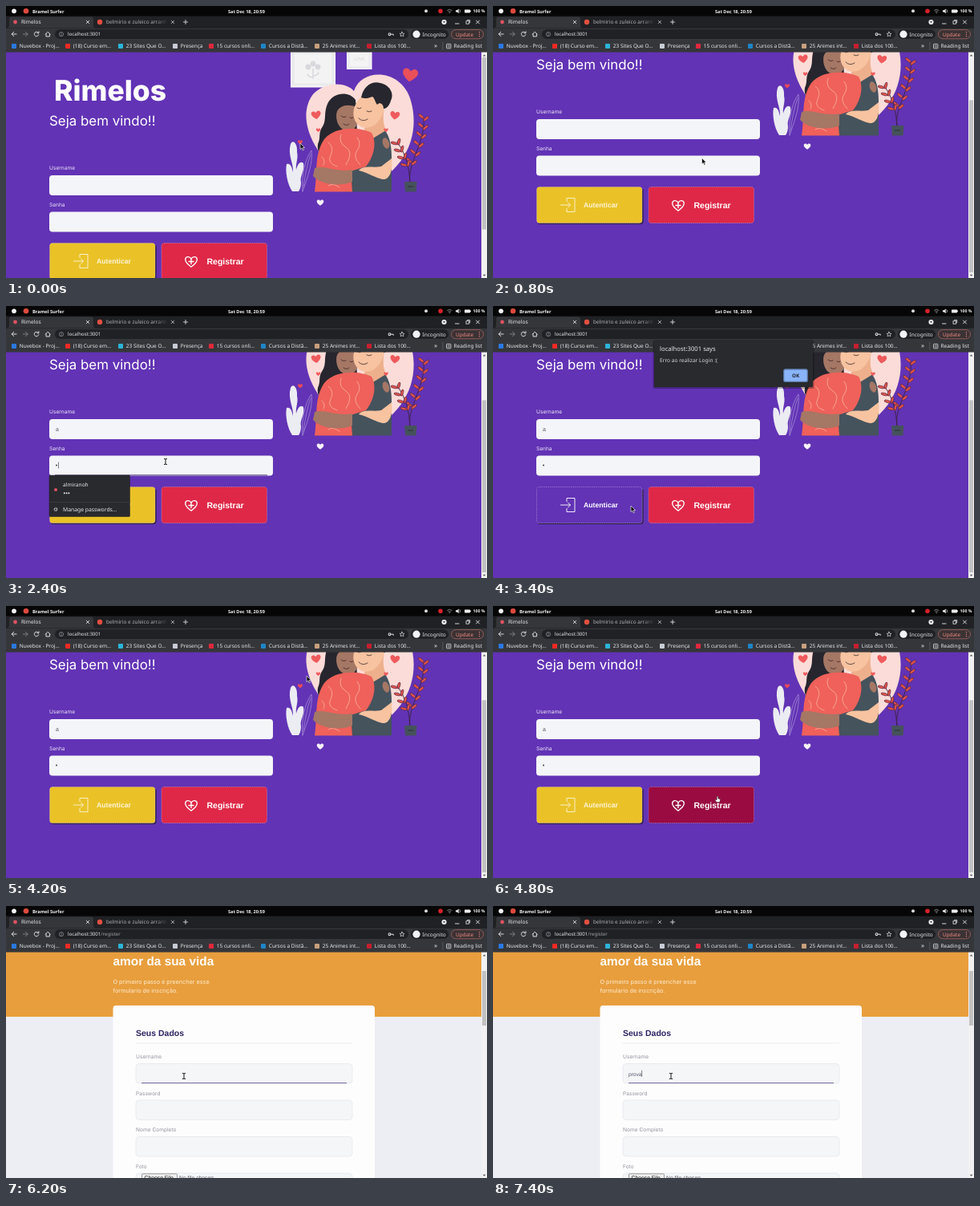
An HTML page for the animation above (8 s loop, 600 by 339 pixels).

```html
<!DOCTYPE html>
<html lang="pt">
<head>
<meta charset="utf-8">
<title>Rimelos</title>
<style>
html, body { margin: 0; width: 100%; height: 100%; overflow: hidden; background: #000; }
svg { display: block; width: 600px; height: 339px; text-rendering: geometricPrecision; }
.ui { font-family: "Noto Sans", sans-serif; }
.body { font-family: Inter, sans-serif; }
.head { font-family: "Liberation Sans", Arial, sans-serif; }
.bold { font-weight: 700; }
.line { fill: none; stroke-linecap: round; stroke-linejoin: round; }
</style>
</head>
<body>
<svg id="stage" viewBox="0 0 600 339" xmlns="http://www.w3.org/2000/svg"></svg>
<script>
const LOOP = 8000, STEP = 200;

// ---- drawing helpers ----
const text = (x, y, size, str, fill, cls = 'ui', more = '') =>
  `<text x="${x}" y="${y}" font-size="${size}" fill="${fill}" class="${cls}" ${more}>${str}</text>`;
const rect = (x, y, w, h, fill, r = 0, more = '') =>
  `<rect x="${x}" y="${y}" width="${w}" height="${h}" rx="${r}" fill="${fill}" ${more}/>`;
const dot = (x, y, r, fill) => `<circle cx="${x}" cy="${y}" r="${r}" fill="${fill}"/>`;
const line = (d, stroke, w = 0.9, more = '') =>
  `<path class="line" d="${d}" stroke="${stroke}" stroke-width="${w}" ${more}/>`;
const shape = (d, fill, more = '') => `<path d="${d}" fill="${fill}" ${more}/>`;
const group = (id, inner, more = '') => `<g id="${id}" ${more}>${inner}</g>`;
const HEART = 'M0 4.2C-3 2-5.4 0-5.4-2.4C-5.4-5.6-1.6-6 0-3.2C1.6-6 5.4-5.6 5.4-2.4C5.4 0 3 2 0 4.2Z';
const heart = (x, y, s, fill, turn = 0) =>
  shape(HEART, fill, `transform="translate(${x} ${y}) rotate(${turn}) scale(${s})"`);
const cross = (x, y, r, c = '#dadce0') =>
  line(`M${x - r} ${y - r}L${x + r} ${y + r}M${x + r} ${y - r}L${x - r} ${y + r}`, c);

// ---- browser window ----
function topBar() {
  return rect(0, 0, 600, 12.5, '#060606') +
    dot(10, 6.3, 2.9, '#f4f4f4') + dot(25, 6.3, 3.3, '#dc4a3d') +
    text(33, 8.5, 5.7, 'Bramel Surfer', '#f2f2f2', 'ui bold') +
    text(300, 8.5, 5.6, 'Sat Dec 18, 20:59', '#f2f2f2', 'ui bold', 'text-anchor="middle"') +
    dot(524, 6.3, 2, '#d8d8d8') +
    dot(542, 6.3, 2.8, '#d6202c') +
    line('M550.5 5.3Q553.3 3 556 5.3M551.8 7Q553.3 5.8 554.8 7', '#8c8c8c') + dot(553.3, 8.5, 0.7, '#8c8c8c') +
    shape('M561 5.2h1.7l2-1.8v5.8l-2-1.8H561z', '#eee') + line('M566 4.6q1.6 1.7 0 3.4', '#eee', 0.7) +
    rect(572, 4.4, 7, 4, '#eee', 0.6) + rect(579, 5.5, 0.9, 1.8, '#eee') +
    text(582.5, 8.4, 5.2, '100 %', '#f2f2f2', 'ui bold');
}

function tabs() {
  return rect(0, 12.5, 600, 15, '#202124') +
    shape('M2 27.5Q4 27 4 24V16.5Q4 13.5 7 13.5H106Q109 13.5 109 16.5V24Q109 27 111 27.5Z', '#35363a') +
    dot(11.5, 20, 2.4, '#dc5360') +
    text(19, 22.3, 6.6, 'Rimelos', '#e8eaed') + cross(102, 20, 1.8) +
    dot(117, 20, 3.2, '#e2503f') +
    text(125, 22.3, 6.5, 'belmirio e zuleico arranh', '#aeb1b6') +
    rect(186, 14, 16, 12, 'url(#fade)') + rect(202, 14, 3, 12, '#202124') +
    cross(208, 20, 1.8, '#aeb1b6') + line('M221.5 20h5M224 17.5v5', '#dadce0') +
    dot(546.5, 20, 3.1, '#e8eaed') + shape('M545 19.2h3l-1.5 1.8z', '#202124') +
    line('M560.5 22h4.5', '#e8eaed', 0.9) +
    rect(574, 18.8, 3.4, 3.4, 'none', 0, 'stroke="#e8eaed" stroke-width=".8"') + line('M575.5 17.6h3.2v3.2', '#e8eaed', 0.8) +
    cross(588.5, 20, 2, '#e8eaed');
}

function toolbar() {
  const c = '#dadce0';
  return rect(0, 27.5, 600, 30.1, '#35363a') +
    line('M13 35H7.2M9.8 32.3L7.1 35l2.7 2.7', c, 1) +
    line('M21.3 35h5.8M24.5 32.3l2.7 2.7-2.7 2.7', '#7d8085', 1) +
    line('M40.4 33.4a2.8 2.8 0 1 0 .4 2.4M40.9 31.8v2h-2', c, 1) +
    line('M49.2 35.2L52.2 32.2l3 3M50 34.6v3.4h4.4v-3.4', c, 1) +
    rect(61, 29.3, 441, 11.8, '#202124', 5.9) +
    `<circle cx="69" cy="35.2" r="2.6" fill="none" stroke="#9aa0a6" stroke-width=".7"/>` +
    line('M69 35v1.4M69 33.8v.1', '#9aa0a6', 0.7) +
    text(77, 37.4, 6.1, 'localhost:3001<tspan id="path" fill="#a0a4aa">/register</tspan>', '#e8eaed') +
    `<circle cx="478.5" cy="35.2" r="1.4" fill="none" stroke="${c}" stroke-width="1.1"/>` +
    line('M480 35.2h3.2v1.2', c, 1) +
    line('M494 32.2l.9 2 2.1.2-1.6 1.4.5 2.1-1.9-1.1-1.9 1.1.5-2.1-1.6-1.4 2.1-.2z', c, 0.7) +
    rect(505, 29.3, 47, 11.8, '#202124', 5.9) + dot(512, 35.2, 4.6, '#f1f3f4') +
    text(519.5, 37.5, 6.5, 'Incognito', '#e8eaed') +
    rect(555.5, 29.6, 40, 11.2, '#3b3234', 5.6, 'stroke="#b46c66" stroke-width=".7"') +
    text(561, 37.5, 6.4, 'Update', '#f28b82') +
    [32.7, 35.2, 37.7].map(y => dot(590.5, y, 0.65, '#f28b82')).join('');
}

function bookmarks() {
  const items = [
    [10, '#2a78e4', 'Nuvebox - Proj…'], [77, '#ee2a24', '(18) Curso em…'],
    [143, '#2bb5d8', '23 Sites Que O…'], [211, '#c8ccd6', 'Presença'],
    [256, '#e0283c', '15 cursos onli…'], [321, '#1d86c8', 'Cursos a Distâ…'],
    [388, '#c8a07c', '25 Animes int…'], [453, '#c61f2e', 'Lista dos 100…']];
  return items.map(([x, c, s]) => rect(x - 3, 47, 6, 6, c, 1) + text(x + 6.8, 52.3, 6.5, s, '#e8eaed')).join('') +
    text(534, 52.4, 8, '»', '#e8eaed') + rect(544.5, 45, 0.7, 10, '#5f6368') +
    rect(549.5, 47.3, 5.4, 5.6, 'none', 0.8, 'stroke="#dadce0" stroke-width=".8"') +
    line('M551 49.2h2.5M551 51h2.5', '#dadce0', 0.7) +
    text(558.5, 52.3, 6.5, 'Reading list', '#e8eaed');
}

// ---- login page ----
function plant() {
  let out = line('M504 220C500 196 524 170 521 139M504 220Q503 190 488 169', '#3b2240', 0.9);
  const leaf = (x, y, a) =>
    `<ellipse cx="4" rx="4.2" ry="1.6" fill="#e2544a" stroke="#4a2340" stroke-width=".6" transform="translate(${x} ${y}) rotate(${a})"/>`;
  for (let i = 0; i < 6; i++) {
    const y = 198 - 11 * i, x = 506 + 15 * Math.sin(i / 5 * Math.PI / 2);
    out += leaf(x, y, -40) + leaf(x, y - 3, -140);
  }
  for (let i = 0; i < 4; i++) out += leaf(501 - 4 * i, 200 - 9 * i, -75) + leaf(500 - 4 * i, 199 - 9 * i, -165);
  return out + shape('M497 219h15.5l-1 12.5h-13.5z', '#45525b') + rect(501, 224, 7, 2, '#36414a');
}

function couple() {
  const hair = '#27262e', pale = '#f7c3a0', brown = '#a57765';
  return shape('M434 106C424 94 398 94 383 110C364 135 374 182 440 231C500 208 517 160 505 118C494 78 444 76 434 106Z', '#fbdcd8') +
    // her hair and face
    shape('M436 117C428 106 408 107 401 122C396 134 400 142 395 150C389 158 393 164 389 172C387 184 396 190 406 186L438 158Z', hair) +
    shape('M414 127C420 117 434 118 438 130C442 145 436 156 426 156C414 154 409 140 414 127Z', brown) +
    shape('M411 142C410 126 422 120 438 126C436 112 418 108 408 118Z', hair) +
    line('M418 137q3 3 6 1M429 139q2 2 4 0M421 147q4 3 7 0', '#3d2521', 0.8) +
    // his body and head
    shape('M464 148C477 154 481 170 481 190V231.5H424L440 160Z', '#45535d') +
    shape('M452 140L472 126C470 138 470 146 474 155L456 166L446 156Z', '#eeb08c') +
    shape('M447 110C438 116 431 128 434 139C437 151 449 155 459 149C467 143 474 132 471 118Z', pale) +
    shape('M443 114C446 100 456 93 467 96C478 98 485 109 480 118C478 125 474 128 471 128C471 122 466 119 463 123C460 119 460 115 457 113C452 115 447 116 443 114Z', hair) +
    dot(467, 127, 3, pale) +
    line('M438 127q3 2 5 0M450 131q3 2 6 0M440 140q5 5 11 1', '#3a2a2c', 0.8) +
    // her shirt and the arms
    shape('M397 166C410 150 440 150 456 158C463 170 459 188 449 200L430 206L432 231.5H385C389 206 384 185 397 166Z', '#ef615a') +
    line('M402 170q8 6 3 16t8 14M418 160q-4 10 6 16t0 22M438 164q6 8 0 16t4 18M394 188q5 5 2 10M402 224q6-4 14 2', '#f9b4a4', 0.8) +
    shape('M385 202C396 198 414 208 432 204V219C416 226 392 222 383 212Z', brown) +
    shape('M481 190C483 206 478 217 470 216C462 215 452 208 440 205C446 198 458 202 468 200Z', pale) +
    `<ellipse cx="474" cy="171" rx="4" ry="7" fill="${brown}" transform="rotate(-18 474 171)"/>`;
}

function art() {
  const border = 'stroke="#fff" stroke-width="1"';
  return rect(355.5, 56, 55, 45, '#ededf0', 0, border) +
    rect(359, 59, 48, 38, '#f3f3f4', 0, 'stroke="#dcdce0" stroke-width=".6"') +
    [[-6, -2], [0, -6], [6, -2]].map(([x, y]) => dot(383 + x, 78 + y, 3.4, '#d9d9dd')).join('') +
    line('M383 78v12M383 87q5 0 7-4M383 89q-5 0-7-4', '#d2d2d8', 1.2) +
    rect(425.5, 54, 30.5, 24.5, '#ededf0', 0, border) +
    rect(429, 57, 23.5, 18, '#f4f4f5') + text(440.7, 68, 5.5, 'LOVE', '#d3d3d9', 'ui', 'text-anchor="middle"') +
    couple() +
    heart(504, 87, 1.75, '#e9505a', 8) + heart(387, 136.5, 1.1, '#ef5a5c', -8) + heart(389.5, 155, 0.5, '#ef5a5c') +
    heart(485, 137, 1.1, '#ef5a5c', 8) + heart(474, 155, 0.5, '#ef5a5c') + heart(367, 170, 0.55, '#ea4b58') +
    heart(392, 245.5, 0.8, '#f7f3fb') +
    shape('M357 231C351 222 348 206 350 197C355 195 357 202 358 207C359 196 351 186 355 172C358 165 364 172 363 182C365 190 361 196 362 204C364 196 368 193 371 196C373 206 366 212 368 220Q368 227 365 231Z', '#ececf3') +
    line('M370 231C368 214 373 190 381 180C383 196 376 214 370 231ZM371 226Q374 202 380 185', '#b9a6de', 0.6) +
    plant();
}

function home() {
  const field = y => rect(54, y, 279, 25, '#f4f5f8', 4);
  const button = (x, fill, id) => rect(x, 295.5, 131.5, 45, fill, 3.5,
    `id="${id}" stroke="#fff" stroke-opacity=".4" stroke-width=".7" stroke-dasharray="1.6 1"`);
  return rect(0, 0, 593, 420, '#6233b5') +
    text(60, 118, 35.5, 'Rimelos', '#fff', 'body', 'font-weight="800"') +
    text(54, 149.2, 16.9, 'Seja bem vindo!!', '#fff', 'body') +
    text(54, 204, 6.6, 'Username', '#eee9f8', 'body') + field(211) +
    text(54, 249.5, 6.6, 'Senha', '#eee9f8', 'body') + field(256.5) +
    line('M57 341.3H184.5Q187 341 187 338.5V299', '#2b2340', 1.3) +
    button(54.5, '#eac228', 'enter') +
    group('enterText', line('M92 313.5V309.5h10v17H92v-4M84.5 318h12M93.5 315l3 3-3 3', '#fff', 0.9) +
      text(113, 321.3, 8.7, 'Autenticar', '#fff', 'head bold')) +
    button(194, '#df2847', 'join') +
    `<path class="line" d="${HEART}" stroke="#fff" stroke-width="1" transform="translate(231 319.5) scale(1.35)"/>` +
    line('M231 315.5v6M228 318.5h6', '#fff', 1.4) +
    text(250.5, 322, 10.5, 'Registrar', '#fff', 'head bold') +
    art() +
    text(62, 225.5, 7, 'a', '#555463', 'head', 'id="userText"') +
    group('passText', dot(63, 268.5, 1, '#444')) +
    rect(0, 0, 0.6, 8, '#333', 0, 'id="caret"') +
    rect(61, 0, 265, 0.9, '#4c3a78', 0, 'id="focus"') +
    group('menu', rect(54, 0, 100.5, 51.5, '#292a2d', 1, 'stroke="#1c1c20" stroke-width=".5"') +
      dot(62, 18, 2, '#dc5360') + text(71, 14.3, 6.6, 'almiranoh', '#e8eaed') +
      [72.8, 75.6, 78.4].map(x => dot(x, 22.3, 1, '#e8eaed')).join('') + rect(54, 33, 100.5, 0.6, '#46474b') +
      `<circle cx="62" cy="42.5" r="1.7" fill="none" stroke="#c0c3c8" stroke-width="1.3" stroke-dasharray="1.1 .25"/>` +
      text(71, 45, 6.8, 'Manage passwords…', '#e8eaed'));
}

// ---- register page ----
function register() {
  const labels = ['Username', 'Password', 'Nome Completo', 'Foto'];
  return rect(0, 57, 593, 282, '#edeef4') + rect(0, 57, 593, 81, '#e89e3d') +
    text(133.5, 73.5, 15.4, 'amor da sua vida', '#fffdf8', 'head bold') +
    text(133.5, 96.5, 7.25, 'O primeiro passo é preencher esse', '#fdecd2', 'body') +
    text(133.5, 108, 7.25, 'formulario de inscrição.', '#fdecd2', 'body') +
    rect(133.5, 124, 326.5, 230, '#fdfdfd', 4) +
    text(162, 161.5, 10.5, 'Seus Dados', '#2d2462', 'head bold') + rect(162, 170.6, 270, 0.7, '#e3e3ee') +
    labels.map((s, i) => text(162, 190 + 45.5 * i, 6.6, s, '#96939f', 'body') +
      rect(162, 196.5 + 45.5 * i, 270, 24.5, '#f4f6f8', 4, 'stroke="#e4e5ec" stroke-width=".7"')).join('') +
    rect(169.5, 333.8, 44, 11, '#efefef', 1, 'stroke="#767676" stroke-width=".7"') +
    text(172.5, 340.7, 6.8, 'Choose File', '#111', 'head') + text(216, 340.7, 6.8, 'No file chosen', '#5d5a68', 'head') +
    group('typing', rect(169, 220.2, 256, 0.9, '#66588f') +
      text(169, 211.5, 6.6, '', '#5c5870', 'head', 'id="typed"') + rect(169, 204.8, 0.6, 8, '#333', 0, 'id="caret2"'));
}

const alertBox = () => rect(199.5, 43, 201, 60, '#000', 2, 'opacity=".3"') + rect(201, 42, 198, 59, '#292a2d', 1.5) +
  text(208, 56, 7.7, 'localhost:3001 says', '#e8eaed') +
  text(208, 70.3, 6.65, 'Erro ao realizar Login :(', '#d5d7db') +
  rect(362.7, 78.8, 29.6, 15.6, '#8ab4f8', 2, 'stroke="#57749f" stroke-width="1.2"') +
  text(377.5, 89, 6.2, 'OK', '#202124', 'ui bold', 'text-anchor="middle"');

const BEAM = 'M-1.6-3.6Q0-3.6 0-2.8Q0-3.6 1.6-3.6M0-2.8V2.8M-1.6 3.6Q0 3.6 0 2.8Q0 3.6 1.6 3.6';
const pointers = {
  arrow: shape('M0 0V7.6L1.8 6L3.1 8.8L4.5 8.2L3.2 5.5H5.6Z', '#111', 'stroke="#fff" stroke-width=".6"'),
  beam: line(BEAM, '#fff', 1.8) + line(BEAM, '#111', 1),
  hand: shape('M-.8-2.5Q0-3.5.8-2.5V0L3 .6Q3.6.8 3.4 2L2.8 4.5H-1.2L-3 1.8Q-2.6.6-.8 1.8Z', '#fff', 'stroke="#222" stroke-width=".5"')
};

document.getElementById('stage').innerHTML =
  `<defs><clipPath id="view"><rect y="57" width="593" height="282"/></clipPath>
   <linearGradient id="fade"><stop stop-color="#202124" stop-opacity="0"/><stop offset="1" stop-color="#202124"/></linearGradient></defs>` +
  `<g clip-path="url(#view)">${group('home', home())}${group('register', register())}</g>` +
  rect(593, 57, 7, 282, '#f1f1f1') + rect(594, 64, 5, 214, '#c1c1c1', 0, 'id="thumb"') +
  shape('M594.8 62.5h3.6l-1.8-2z', '#505050') + shape('M594.8 334.8h3.6l-1.8 2z', '#505050') +
  topBar() + tabs() + toolbar() + bookmarks() +
  group('status', rect(-2, 329, 77, 12, '#35363a', 2, 'stroke="#55575c" stroke-width=".5"') +
    text(2, 336.5, 6.5, 'localhost:3001/register', '#c6c9ce')) +
  group('alert', alertBox()) +
  Object.keys(pointers).map(k => group(k, pointers[k])).join('');

// ---- motion ----
// time, x, y, pointer
const path = [
  [0, 367, 171, 'arrow'], [400, 362, 172, 'arrow'], [1200, 159, 207, 'arrow'], [1400, 140, 160, 'beam'],
  [1800, 138, 156, 'beam'], [2200, 199, 194, 'beam'], [2600, 199, 194, 'beam'], [2800, 186, 222, 'arrow'],
  [3000, 172, 249, 'arrow'], [3400, 172, 249, 'arrow'], [4000, 375, 87, 'arrow'], [4200, 375, 87, 'arrow'],
  [4600, 296, 222, 'hand'], [4800, 280, 240, 'hand'], [5000, 277, 245, 'beam'], [5200, 277, 245, 'beam'],
  [5600, 222, 212, 'beam'], [LOOP, 222, 212, 'beam']];
const el = id => document.getElementById(id);
const set = (id, attrs) => { for (const k in attrs) el(id).setAttribute(k, attrs[k]); };
const show = (id, on) => set(id, { display: on ? 'inline' : 'none' });
const within = (t, a, b) => t >= a && t < b;

function pointer(t) {
  const i = path.findIndex(p => p[0] > t) - 1, a = path[i], b = path[i + 1];
  const k = (t - a[0]) / (b[0] - a[0]), e = k * k * (3 - 2 * k);
  for (const name in pointers) show(name, name === a[3]);
  set(a[3], { transform: `translate(${a[1] + (b[1] - a[1]) * e} ${a[2] + (b[2] - a[2]) * e})` });
}

function draw(now) {
  const t = Math.floor(now % LOOP / STEP) * STEP;
  const joined = t >= 5000;
  const scroll = 70 * Math.sin(Math.PI / 2 * Math.min(1, Math.max(0, (t - 200) / 600)));
  set('home', { transform: `translate(0 ${-scroll})` });
  set('thumb', joined ? { y: 81, height: 68 } : { y: 64 + scroll * 268 / 351, height: 214.5 });
  show('home', !joined);
  show('register', joined);
  show('path', joined);
  show('status', within(t, 5000, 5400));

  const inUser = within(t, 1600, 2200), inPass = within(t, 2200, 3000);
  show('userText', t >= 1800);
  show('passText', t >= 2400);
  show('caret', inUser || inPass);
  set('caret', { x: inPass ? (t >= 2400 ? 65 : 62) : (t >= 1800 ? 66.5 : 62), y: inPass ? 264.5 : 219 });
  show('focus', inUser || inPass);
  set('focus', { y: inPass ? 280.3 : 234.8 });
  show('menu', within(t, 1600, 2000) || within(t, 2200, 2800));
  set('menu', { transform: `translate(0 ${inPass ? 281 : 235.5})` });

  const onEnter = within(t, 3000, 4200);
  set('enter', { fill: onEnter ? '#6233b5' : '#eac228' });
  set('enterText', { opacity: onEnter ? 1 : 0.82 });
  set('join', { fill: within(t, 4600, 5000) ? '#9a0b41' : '#df2847' });
  show('alert', within(t, 3200, 4200));

  const count = [6800, 7000, 7200, 7200, 7400].filter(k => t >= k).length;
  show('typing', t >= 5600);
  el('typed').textContent = 'prova'.slice(0, count);
  show('caret2', !within(t, 6200, 6800));
  set('caret2', { x: 169 + (count ? el('typed').getComputedTextLength() : 0) });
  pointer(t);
}

const start = performance.now();
function tick() {
  draw(performance.now() - start);
  requestAnimationFrame(tick);
}
tick();
</script>
</body>
</html>
```
